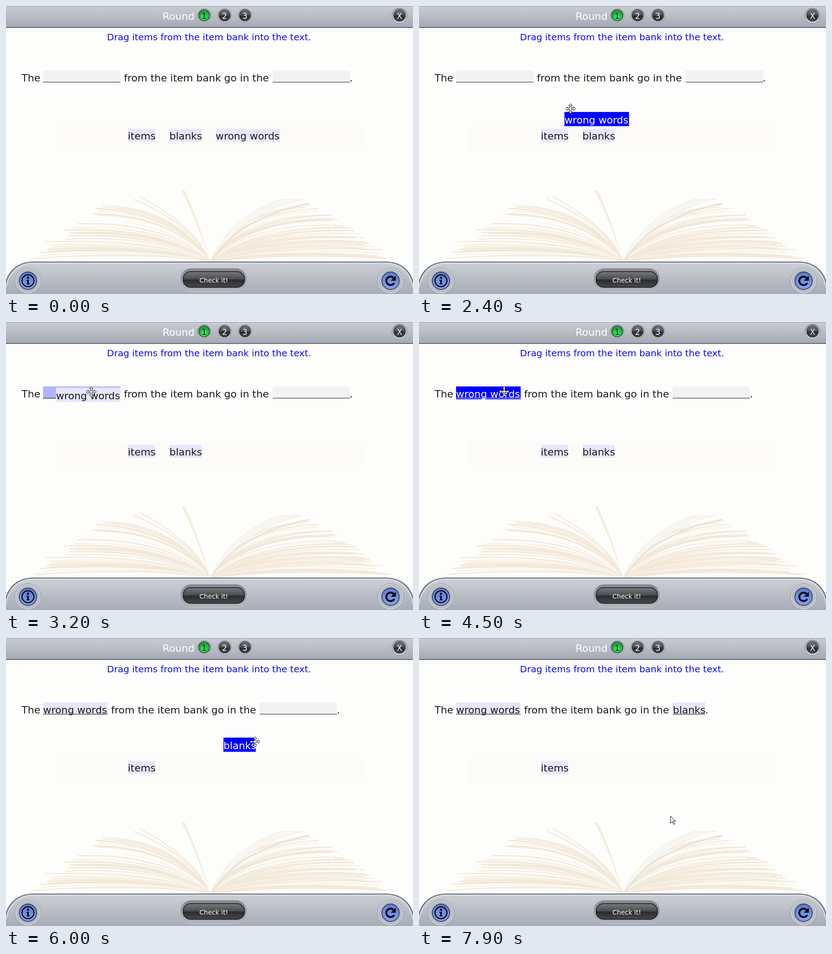
These frames come from a looping animation (889 px wide and 630 px high, 8 s). An HTML page:

```html
<!DOCTYPE html>
<html lang="en">
<head>
<meta charset="utf-8">
<title>Fill in the blanks</title>
<style>
  html, body { margin: 0; width: 100%; height: 100%; overflow: hidden; background: #fdfdfb; }
  svg { display: block; width: 100vw; height: 100vh; font-family: 'DejaVu Sans', sans-serif; }
  .body { font-size: 22px; fill: #1c1c1c; }
  .chip text { font-size: 21.9px; }
  .num { font-size: 17px; text-anchor: middle; }
</style>
</head>
<body>
<svg viewBox="0 0 889 630">
  <defs>
    <linearGradient id="bar" x2="0" y2="1">
      <stop stop-color="#c9ccd2"/><stop offset=".45" stop-color="#b9bdc5"/><stop offset="1" stop-color="#a4a9b3"/>
    </linearGradient>
    <linearGradient id="foot" x2="0" y2="1">
      <stop stop-color="#cdd0d6"/><stop offset="1" stop-color="#a6abb5"/>
    </linearGradient>
    <linearGradient id="rim" x2="0" y2="1">
      <stop stop-color="#868a92"/><stop offset="1" stop-color="#dcdee2"/>
    </linearGradient>
    <linearGradient id="socket" x2="0" y2="1">
      <stop stop-color="#82878f"/><stop offset="1" stop-color="#b3b7be"/>
    </linearGradient>
    <linearGradient id="dark" x2="0" y2="1">
      <stop stop-color="#77797d"/><stop offset=".48" stop-color="#4a4b4e"/>
      <stop offset=".52" stop-color="#2b2c2e"/><stop offset="1" stop-color="#47484b"/>
    </linearGradient>
    <radialGradient id="green" cy=".65">
      <stop stop-color="#45ec6c"/><stop offset="1" stop-color="#16a63c"/>
    </radialGradient>
    <linearGradient id="blue" x2="0" y2="1">
      <stop stop-color="#5b78cb"/><stop offset="1" stop-color="#87a3f2"/>
    </linearGradient>
    <clipPath id="page"><path d="M0 48H889V560H0Z"/></clipPath>
  </defs>

  <rect width="889" height="630" fill="#fdfdfb"/>
  <rect x="107" y="262" width="675" height="53" fill="#fdfbf8"/>
  <g id="book" clip-path="url(#page)" fill="none"></g>

  <rect width="889" height="47" fill="url(#bar)"/>
  <path d="M0 .5H889" stroke="#9ba0aa"/>
  <path d="M0 47H889" stroke="#626a7a" stroke-width="2"/>
  <text x="342" y="30" font-size="22" fill="#fff">Round</text>
  <g id="badges"></g>

  <path d="M-2 632V611C4 580 26 560 60 560H829C863 560 885 580 891 611V632Z" fill="url(#foot)" stroke="#626a7a" stroke-width="2"/>
  <path d="M0 616C6 584 28 562.5 60 562.5H829C861 562.5 883 584 889 616" fill="none" stroke="#dfe1e5" stroke-width="1.5"/>
  <g id="corners"></g>
  <g fill="#0b0d14">
    <circle cx="48" cy="601" r="13" fill="none" stroke="#0b0d14" stroke-width="2.6"/>
    <circle cx="48" cy="594.5" r="2.5"/>
    <path d="M44.5 599H50V607H52V609H44.5V607H46.3V601H44.5Z"/>
    <path d="M848 606A9.3 9.3 0 1 1 847 595" fill="none" stroke="#0b0d14" stroke-width="4"/>
    <path d="M851.5 590V601H840.5Z"/>
  </g>

  <rect x="380.5" y="573.5" width="146" height="51" rx="24" fill="url(#socket)" stroke="#c3c6cc"/>
  <rect x="387" y="581" width="134" height="34.5" rx="16" fill="url(#dark)" stroke="#161719" stroke-width="1.5"/>
  <text x="422.5" y="605" font-size="14" fill="#fff">Check it!</text>

  <text x="443.5" y="75" font-size="20" text-anchor="middle" fill="#0c0cf2">Drag items from the item bank into the text.</text>

  <g id="gapA"><rect width="169" height="27"/><path d="M0 25.5H169" stroke="#222"/></g>
  <g id="gapB"><rect width="169" height="27"/><path d="M0 25.5H169" stroke="#222"/></g>
  <g class="body">
    <text x="34" y="165">The</text>
    <text id="middle" y="165">from the item bank go in the</text>
    <text id="stop" y="165">.</text>
  </g>
  <g id="chips"></g>

  <g stroke="#000" fill="#fff" stroke-linejoin="round">
    <path id="arrow" d="M.5 .5V16.2L4.2 12.7 7.2 18.8 9.6 17.7 6.8 11.8H11.5Z"/>
    <path id="cross" d="M0-11L4-7H1.5V-1.5H7V-4L11 0 7 4V1.5H1.5V7H4L0 11-4 7H-1.5V1.5H-7V4L-11 0-7-4V-1.5H-1.5V-7H-4Z"/>
  </g>
</svg>

<script>
const LOOP = 8000, STEP = 100;
const $ = id => document.getElementById(id);
const add = (id, markup) => $(id).insertAdjacentHTML('beforeend', markup);
const place = (el, x, y) => el.setAttribute('transform', `translate(${x} ${y})`);
const show = (el, on) => { el.style.display = on ? '' : 'none'; };
const lerp = (a, b, f) => a + (b - a) * f;

let seed = 11;
const random = () => (seed = seed * 16807 % 2147483647) / 2147483647;

// Pages fan out from the spine; tips run from the top page (s = 0) down to the cover (s = 1)
function drawPages(spine, top, cover, bend) {
  const count = 44;
  for (let i = 0; i < count; i++) {
    const s = i / (count - 1);
    const x = lerp(top, cover, s ** .85) + 36 * (random() - .5);
    const y = lerp(432, 552, s) + 6 * random();
    const cx = lerp(bend, (spine + cover) / 2, s * .7);
    const cy = lerp(447, 540, s ** 1.2);
    const tone = ['#f4e8d6', '#f7eee1', '#f1e7d9', '#fdfcf8'][Math.floor(random() * 4)];
    add('book', `<path d="M${x} ${y}Q${cx} ${cy} ${spine} ${555 + 4 * s}" stroke="${tone}" stroke-width="${1.5 + 1.5 * random()}"/>`);
  }
}
drawPages(443, 225, 62, 375);
drawPages(450, 655, 830, 500);
add('book', `
  <path d="M447 556Q492 458 600 423H648Q520 452 447 556Z" fill="#f8f6f1" stroke="#f3eadb"/>
  <path d="M662 432Q510 462 450 556" stroke="#e9e2d9" stroke-width="3"/>
  <path d="M292 417Q412 480 444 556M280 423Q404 476 441 554" stroke="#f4e9d9" stroke-width="2.5"/>
  <path d="M384 404L390 403Q424 475 444 556Q415 465 384 404Z" fill="#f5ebdc"/>`);

function drawBadge(x, r, rim, fill, label, ink = '#fff', style = '') {
  add('badges', `
    <circle cx="${x}" cy="21" r="${r + rim}" fill="url(#rim)" stroke="#858a94"/>
    <circle cx="${x}" cy="21" r="${r}" fill="url(#${fill})" stroke="#2c2e32" stroke-width="1.2"/>
    <text class="num" x="${x}" y="27.5" fill="${ink}" style="${style}">${label}</text>`);
}
drawBadge(433, 12, 3, 'green', 1, '#06230e');
drawBadge(477.5, 12, 3, 'dark', 2);
drawBadge(522, 12, 3, 'dark', 3);
drawBadge(859.5, 12.5, 4, 'dark', 'X', '#fff', 'font: bold 12px "DejaVu Sans", sans-serif; translate: 0 -2.5px');

for (const x of [48, 840]) add('corners', `
  <circle cx="${x}" cy="601" r="28.5" fill="#b9bdc5" stroke="#868b95"/>
  <circle cx="${x}" cy="601" r="27" fill="none" stroke="#cfd2d8" stroke-width="2"/>
  <circle cx="${x}" cy="601" r="19" fill="url(#blue)" stroke="#39425f" stroke-width="1.8"/>`);

// Draggable words
const BLUE = '#00f', PALE = '#e6e6fd', HOT = '#b3b3ff', EMPTY = '#f0f3f1';
const LINE_TOP = 141;

function makeChip(word, width) {
  add('chips', `<g class="chip"><rect width="${width}"/><text>${word}</text><path d="M0 25.5H${width}"/></g>`);
  const el = $('chips').lastElementChild;
  const [box, text, line] = el.children;
  return ([x, y], { lit = false, drag = false, set = false } = {}) => {
    const ink = lit ? '#fff' : '#1c1c1c';
    place(el, x, y);
    box.setAttribute('height', drag ? 31 : 28);
    box.setAttribute('fill', lit ? BLUE : PALE);
    text.setAttribute('y', drag ? 25 : set ? 24 : 23);
    text.setAttribute('fill', ink);
    line.setAttribute('stroke', ink);
    show(line, set);
  };
}
const drawItems = makeChip('items', 60);
const drawWrong = makeChip('wrong words', 141);
const drawBlanks = makeChip('blanks', 70.5);
drawItems([266, 269]);

// Eased move; each axis slows down by its own power
function glide(t, begin, end, from, to, power) {
  const rest = 1 - Math.min(1, Math.max(0, (t - begin) / (end - begin)));
  return from.map((v, axis) => lerp(to[axis], v, rest ** power[axis]));
}

const wrong = {
  hover: 1800, begin: 2200, over: 3000, end: 3400, drop: 3900,
  from: [458, 269], to: [107, 139], power: [2.8, 1.85], grab: [79, 13], lead: 125
};
const blanks = {
  hover: 5100, begin: 5600, over: 6500, end: 6800, drop: 7100,
  from: [357, 269], to: [584, 138], power: [1.81, 1.22], grab: [51, 18], lead: 75
};
const dragAt = (d, t) => glide(t, d.begin, d.end, d.from, d.to, d.power);
const grabAt = (d, t) => dragAt(d, t + (t < d.begin ? 0 : d.lead)).map((v, axis) => v + d.grab[axis]);

function drawDragged(draw, d, t) {
  draw(dragAt(d, t), { lit: t >= d.hover && t < d.over, drag: t >= d.begin });
}

const pointerPhases = [
  { begin: 100, end: 300, shape: 'arrow', at: t => glide(t, 100, 200, [808, 544], [881, 315], [1, 1]) },
  { begin: 1400, end: wrong.hover, shape: 'arrow', at: t => glide(t, 1400, 1900, [616, 612], [540, 285], [3, 3]) },
  { begin: wrong.hover, end: wrong.drop, shape: 'cross', at: t => grabAt(wrong, t) },
  { begin: 4500, end: 4700, shape: 'cross', at: () => grabAt(wrong, wrong.end) },
  { begin: 4700, end: blanks.hover, shape: 'arrow', at: t => glide(t, 4700, 5100, [187, 172], [408, 287], [.5, 1.2]) },
  { begin: blanks.hover, end: blanks.drop, shape: 'cross', at: t => grabAt(blanks, t) },
  { begin: blanks.drop, end: LOOP, shape: 'arrow', at: t => glide(t, 7500, 7900, [634, 156], [549, 389], [1.65, 1.65]) }
];

function drawPointer(t) {
  const phase = pointerPhases.find(p => t >= p.begin && t < p.end);
  for (const shape of ['arrow', 'cross']) show($(shape), phase?.shape === shape);
  if (phase) place($(phase.shape), ...phase.at(t));
}

function drawGap(el, x, hot, visible) {
  show(el, visible);
  place(el, x, LINE_TOP);
  el.firstElementChild.setAttribute('fill', hot ? HOT : EMPTY);
}

function render(t) {
  const firstSet = t >= wrong.drop, secondSet = t >= blanks.drop;
  drawGap($('gapA'), 81, t >= wrong.over, !firstSet);
  drawGap($('gapB'), firstSet ? 554 : 582.5, t >= blanks.over, !secondSet);
  $('middle').setAttribute('x', firstSet ? 229.5 : 257.5);
  $('stop').setAttribute('x', secondSet ? 625 : firstSet ? 722.5 : 750.5);

  if (firstSet) drawWrong([81, LINE_TOP], { lit: t < 4700, set: true });
  else drawDragged(drawWrong, wrong, t);

  if (secondSet) drawBlanks([554.5, LINE_TOP], { set: true });
  else drawDragged(drawBlanks, blanks, t);

  drawPointer(t);
}

const start = performance.now();
function tick() {
  const t = (performance.now() - start) % LOOP;
  render(Math.floor(t / STEP) * STEP);
  requestAnimationFrame(tick);
}
tick();
</script>
</body>
</html>
```
